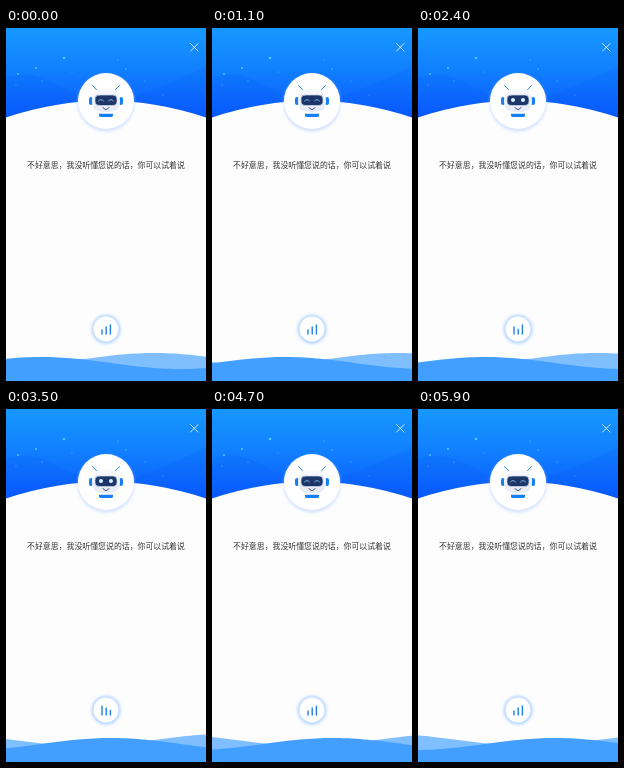
An HTML page that plays this animation: 200 by 353 pixels, repeating every 6000 ms.

```html
<!DOCTYPE html>
<html lang="zh-CN">
<head>
<meta charset="utf-8">
<title>Voice assistant</title>
<style>
html, body { margin: 0; width: 100%; height: 100%; overflow: hidden; background: #fdfdfe; }
svg { display: block; width: 200px; height: 353px; }
text { font: 7.9px "Noto Sans CJK SC", "Noto Sans CJK", sans-serif; fill: #333; }
</style>
</head>
<body>
<svg viewBox="0 0 200 353">
  <defs>
    <linearGradient id="sky" x1="0" y1="0" x2="0" y2="1">
      <stop offset="0" stop-color="#1798ff"/>
      <stop offset=".45" stop-color="#1180ff"/>
      <stop offset="1" stop-color="#0857ff"/>
    </linearGradient>
    <linearGradient id="head" x1="0" y1="0" x2="0" y2="1">
      <stop offset="0" stop-color="#f8f9fd"/>
      <stop offset="1" stop-color="#e6eaf4"/>
    </linearGradient>
    <filter id="glow" x="-50%" y="-50%" width="200%" height="200%">
      <feGaussianBlur stdDeviation="1.8"/>
    </filter>
  </defs>

  <rect width="200" height="353" fill="#fdfdfe"/>
  <rect width="200" height="92" fill="url(#sky)"/>
  <g fill="#0650ee" opacity=".12">
    <path d="M0 50Q22 42 42 52T82 72V92H0Z"/>
    <path d="M122 72Q140 64 156 58T200 38V92H122Z"/>
  </g>
  <g id="stars" fill="#5cc4ff"></g>
  <path d="M0 89.5Q100 56 200 89.5V100H0Z" fill="#fdfdfe"/>
  <path d="M184.300 15.300l8 8m0-8l-8 8" stroke="#e8f4ff" stroke-width=".9"/>

  <circle cx="100" cy="75" r="28.5" fill="#b4ceff" opacity=".55" filter="url(#glow)"/>
  <circle cx="100" cy="73" r="28" fill="#fff"/>

  <g stroke-linecap="round">
    <path d="M86.5 57.5l4 4.2M113.5 57.5l-4 4.2" stroke="#2386d8" stroke-width="1"/>
    <rect x="83" y="69" width="4" height="8" rx="2" fill="#1680f0"/>
    <rect x="113" y="69" width="4" height="8" rx="2" fill="#1680f0"/>
    <path d="M86 73C86 64 91 61 100 61S114 64 114 73 109 84 100 84 86 82 86 73Z" fill="url(#head)"/>
    <rect x="89" y="67" width="22" height="10.500" rx="4" fill="#1d3567" stroke="#cfdcf2" stroke-width=".7"/>
    <g id="open" fill="#d5f2ff">
      <circle cx="95" cy="72" r="2"/>
      <circle cx="105" cy="72" r="2"/>
    </g>
    <path id="shut" d="M92.500 73q2.500-3 5 0M102.500 73q2.500-3 5 0" fill="none" stroke="#7cc6f5" stroke-width=".9"/>
    <path d="M97 79.500q3 4.400 6 0" fill="none" stroke="#24395f" stroke-width=".9"/>
    <path d="M93 85.800H107V87.500Q107 89 105 89H95Q93 89 93 87.500Z" fill="#1680f0"/>
  </g>

  <text x="100" y="139.500" text-anchor="middle">不好意思，我没听懂您说的话，你可以试着说</text>

  <circle cx="100" cy="301.300" r="14.500" fill="#86bcff" opacity=".6" filter="url(#glow)"/>
  <circle cx="100" cy="301" r="12.500" fill="#fff"/>
  <g id="bars" fill="none" stroke="#1f80e8" stroke-width="1.400" stroke-linecap="round">
    <path/><path/><path/>
  </g>

  <path id="back" fill="#80bfff"/>
  <path id="front" fill="#429fff"/>
</svg>
<script>
const LOOP = 6000, STEP = 100, BEAT = 960;
const WAVE = 280, SPEED = .22; // px, px per ms
const $ = id => document.getElementById(id);
const bars = [...$('bars').children];

// Phase within a beat, then the height of each bar
const levels = [
  [0, 5, 8, 10],
  [.2, 5, 8, 10],
  [.5, 8, 5.5, 10],
  [.66, 10, 8, 5],
  [.9, 5, 8, 10],
  [1, 5, 8, 10]
];

// Stars: x, y, radius
const stars = [
  [12, 46, .9], [30, 40, 1], [58, 30, 1.3], [36, 53, .6], [10, 57, .5],
  [66, 44, .5], [112, 32, .6], [120, 41, .7], [139, 53, .6], [157, 67, .5]
];
$('stars').innerHTML = stars
  .map(([x, y, r]) => `<circle cx="${x}" cy="${y}" r="${r}"/>`).join('');

function barHeight(phase, i) {
  const n = levels.findIndex(row => row[0] > phase);
  const a = levels[n - 1], b = levels[n];
  return a[i] + (b[i] - a[i]) * (phase - a[0]) / (b[0] - a[0]);
}

function wave(mid, amp, peak) {
  let d = 'M0 353';
  for (let x = 0; x <= 200; x += 4) {
    const y = mid - amp * Math.cos((x - peak) / WAVE * 2 * Math.PI);
    d += `L${x} ${y.toFixed(2)}`;
  }
  return d + 'V353Z';
}

function draw(t) {
  const shift = t * SPEED;
  $('back').setAttribute('d', wave(331, 6, 148 - shift));
  $('front').setAttribute('d', wave(335, 6, 35 - shift));

  const phase = t % BEAT / BEAT;
  bars.forEach((bar, i) =>
    bar.setAttribute('d', `M${96 + i * 4.2} 306v${-barHeight(phase, i + 1) + 1}`));

  const awake = t >= 1300 && t < 4100;
  $('open').style.display = awake ? '' : 'none';
  $('shut').style.display = awake ? 'none' : '';
}

const start = performance.now();
function tick() {
  const t = (performance.now() - start) % LOOP;
  draw(Math.floor(t / STEP) * STEP);
  requestAnimationFrame(tick);
}
tick();
</script>
</body>
</html>
```
